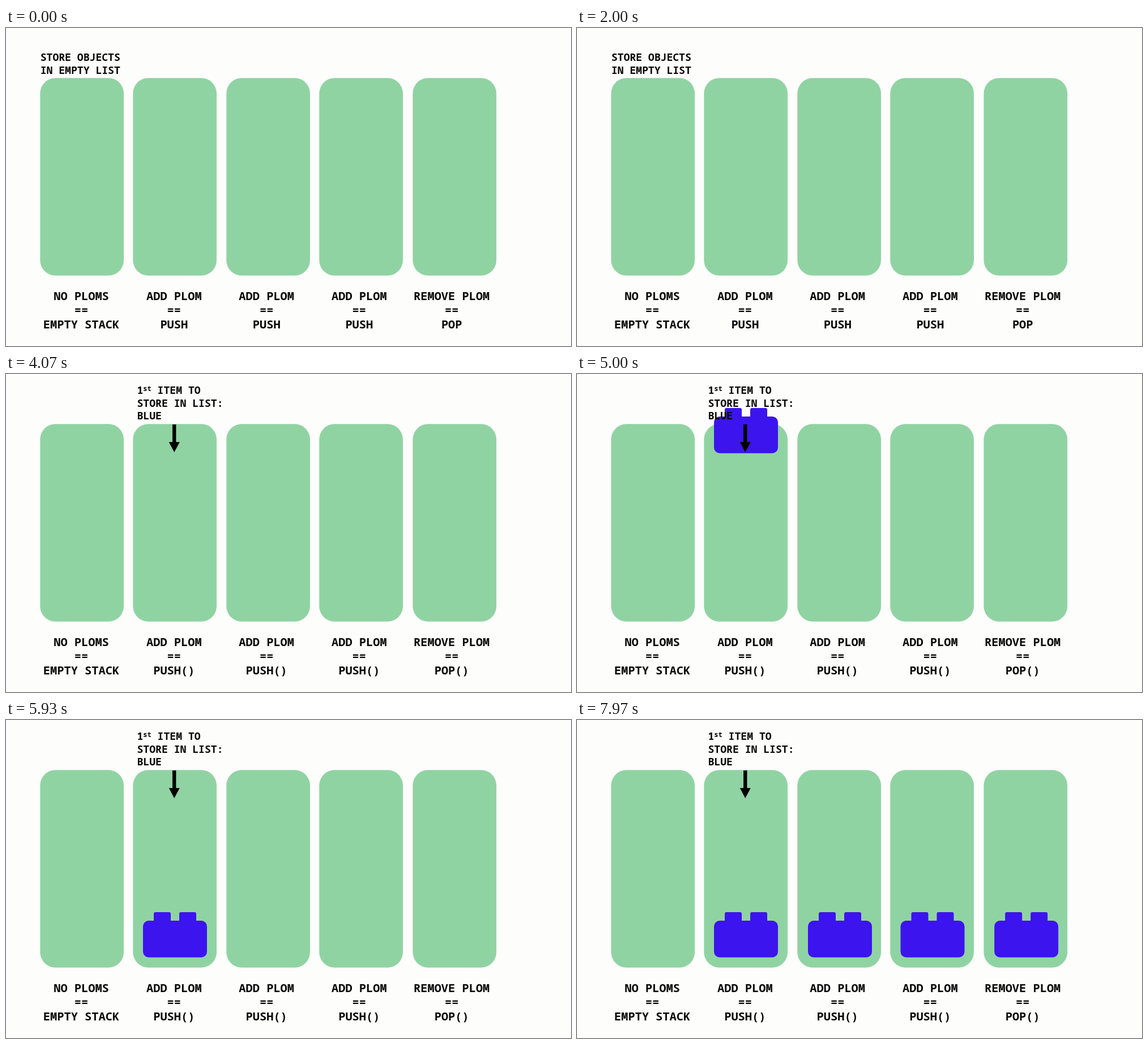
Recreate the animation shown at these times as an HTML page. Size 998 by 561 pixels, loop 8 s.

```html
<!DOCTYPE html>
<html lang="en">
<head>
<meta charset="utf-8">
<title>Stack push and pop</title>
<style>
  html, body { margin: 0; width: 100%; height: 100%; overflow: hidden; background: #fdfdfc; }
  svg { display: block; width: 998px; height: 561px; }
  text { font: 600 18.1px "Noto Sans Mono", "DejaVu Sans Mono", monospace; fill: #060606; }
  .label { font-size: 20.35px; text-anchor: middle; }
  .column { fill: #90d3a3; }
  .brick { fill: #3c14ee; }
  .sup { font-size: 12px; }
</style>
</head>
<body>
<svg viewBox="0 0 998 561">
  <defs>
    <g id="brick">
      <rect y="354" width="113" height="64.7" rx="10"/>
      <rect x="19" y="339" width="30" height="22" rx="3"/>
      <rect x="64" y="339" width="30" height="22" rx="3"/>
    </g>
  </defs>
  <g id="columns"></g>
  <g id="bricks"></g>
  <g id="labels"></g>
  <g id="intro">
    <text x="60.7" y="57.5">STORE OBJECTS</text>
    <text x="60.7" y="80.5">IN EMPTY LIST</text>
  </g>
  <g id="first">
    <text x="231.5" y="35">1<tspan class="sup" dy="-5">st</tspan><tspan dy="5"> ITEM TO</tspan></text>
    <text x="231.5" y="57.5">STORE IN LIST:</text>
    <text x="231.5" y="80">BLUE</text>
    <path d="M294 89h6.4v31h6.4l-9.6 18-9.4-18h6.2z"/>
  </g>
</svg>
<script>
const LOOP = 8000;
const CALL_AT = 2630;               // captions switch to method calls
const DROP_AT = 4884, DROP_MS = 636, DROP_HEIGHT = 419;

const columns = [
  { x: 60.3, mid: 133, text: "NO PLOMS", op: "EMPTY STACK" },
  { x: 224.3, mid: 296.8, text: "ADD PLOM", op: "PUSH", brickX: 242, at: DROP_AT },
  { x: 389.3, mid: 460.2, text: "ADD PLOM", op: "PUSH", brickX: 408, at: 6470 },
  { x: 553.3, mid: 623.8, text: "ADD PLOM", op: "PUSH", brickX: 571.5, at: 7070 },
  { x: 718.5, mid: 787.2, text: "REMOVE PLOM", op: "POP", brickX: 737.2, at: 7770 },
];

const byId = id => document.getElementById(id);

function add(parent, tag, attrs, text = "") {
  const node = document.createElementNS("http://www.w3.org/2000/svg", tag);
  for (const name in attrs) node.setAttribute(name, attrs[name]);
  node.textContent = text;
  return byId(parent).appendChild(node);
}

for (const col of columns) {
  add("columns", "rect", { class: "column", x: col.x, y: 88.3, width: 147.7, height: 348.4, rx: 27 });
  const label = (y, text) => add("labels", "text", { class: "label", x: col.mid, y }, text);
  label(479.5, col.text);
  label(504.5, "==");
  col.opNode = label(529.5, col.op);
  if (col.at) col.brick = add("bricks", "use", { class: "brick", href: "#brick", x: col.brickX });
}

const show = (node, on) => node.setAttribute("visibility", on ? "visible" : "hidden");

function draw(now) {
  const t = now % LOOP;
  const calls = t >= CALL_AT;
  show(byId("intro"), !calls);
  show(byId("first"), calls);
  for (const col of columns) {
    if (!col.brick) continue;
    col.opNode.textContent = col.op + (calls ? "()" : "");
    show(col.brick, t >= col.at);
  }
  // The first brick drops in and slows down quadratically.
  const left = 1 - Math.min(1, Math.max(0, (t - DROP_AT) / DROP_MS));
  columns[1].brick.setAttribute("y", -DROP_HEIGHT * left * left);
}

function tick() {
  draw(performance.now());
  requestAnimationFrame(tick);
}
tick();
</script>
</body>
</html>
```
